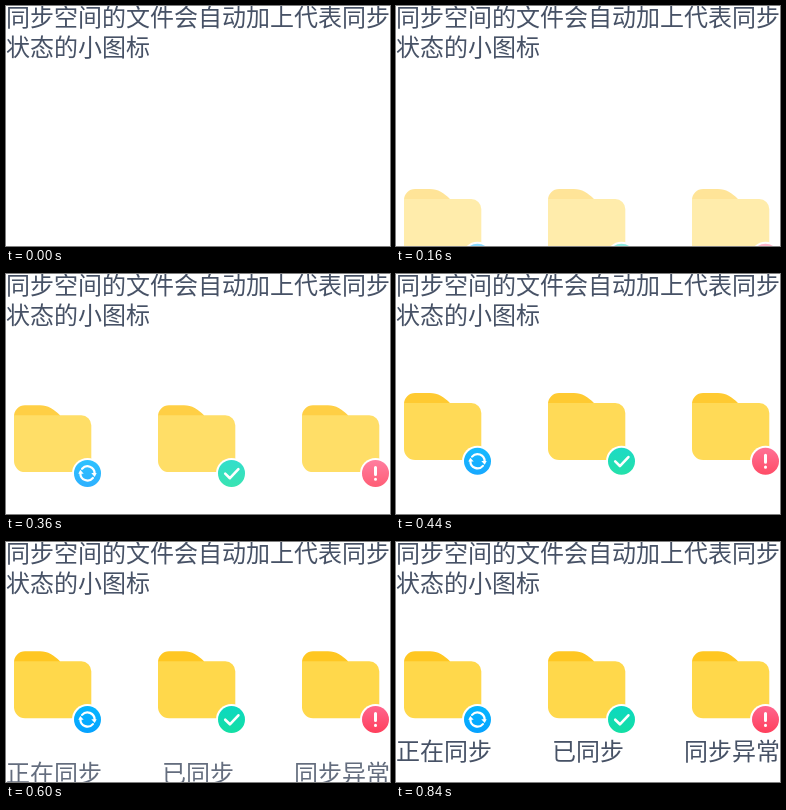
Animation of 384x240 px, one loop 3000 ms. Source, as an HTML page:

```html
<!DOCTYPE html>
<html lang="zh-CN">
<head>
<meta charset="utf-8">
<style>
html, body { margin: 0; width: 100%; height: 100%; overflow: hidden; background: #fff; }
svg { display: block; width: 384px; height: 240px; }
text { font: 24px "Noto Sans CJK SC", "Noto Sans CJK", sans-serif; fill: #475266; }
.icon { fill: none; stroke: #fff; stroke-linecap: round; stroke-linejoin: round; }
</style>
</head>
<body>
<svg viewBox="0 0 384 240">
  <defs>
    <linearGradient id="blue" x2="0" y2="1"><stop stop-color="#06b6ff"/><stop offset="1" stop-color="#06a2ff"/></linearGradient>
    <linearGradient id="green" x2="0" y2="1"><stop stop-color="#0cd8c2"/><stop offset="1" stop-color="#14dfa4"/></linearGradient>
    <linearGradient id="red" x2="0" y2="1"><stop stop-color="#ff668e"/><stop offset="1" stop-color="#ff3f5c"/></linearGradient>
    <g id="folder">
      <path fill="#ffc722" d="M8 124V120.3a11 11 0 0 1 11-11H34c8 0 14 4 20 10V124z"/>
      <path fill="#ffd84b" d="M8 119.3H75.3a10 10 0 0 1 10 10V165.2a11 11 0 0 1-11 11H19a11 11 0 0 1-11-11z"/>
      <circle cx="81.5" cy="177.5" r="15.5" fill="#fff"/>
    </g>
  </defs>
  <text x="0" y="20">同步空间的文件会自动加上代表同步</text>
  <text x="0" y="50">状态的小图标</text>

  <g id="folders">
    <g>
      <use href="#folder"/>
      <g transform="translate(81.5 177.5)">
        <circle r="13.5" fill="url(#blue)"/>
        <g id="arrow">
          <path class="icon" stroke-width="2.2" d="M-5.4-4.6A7.1 7.1 0 0 1 7.1 0"/>
          <path fill="#fff" d="M3.8-.3H9.2L7.2 3.6z"/>
        </g>
        <use href="#arrow" transform="rotate(180)"/>
      </g>
    </g>
    <g transform="translate(144)">
      <use href="#folder"/>
      <g transform="translate(81.5 177.5)">
        <circle r="13.5" fill="url(#green)"/>
        <path class="icon" stroke-width="2.6" d="M-6.3 .2L-1.6 4.8L6.9-4.2"/>
      </g>
    </g>
    <g transform="translate(288)">
      <use href="#folder"/>
      <g transform="translate(81.5 177.5)">
        <circle r="13.5" fill="url(#red)"/>
        <path class="icon" stroke-width="3" d="M0-6V1M0 5.8V5.9"/>
      </g>
    </g>
  </g>

  <g id="labels">
    <text x="0" y="218">正在同步</text>
    <text x="156" y="218">已同步</text>
    <text x="288" y="218">同步异常</text>
  </g>
</svg>
<script>
const LOOP = 3000, STEP = 40, DURATION = 600, RISE = 137;
const folders = document.getElementById('folders');
const labels = document.getElementById('labels');

// Rise into place while fading in, quadratic ease-out
function enter(group, time) {
  const left = 1 - Math.min(1, Math.max(0, time / DURATION));
  group.setAttribute('transform', `translate(0 ${RISE * left * left})`);
  group.setAttribute('opacity', 1 - left * left);
}

function draw() {
  const time = Math.floor(performance.now() % LOOP / STEP) * STEP;
  enter(folders, time);
  enter(labels, time - 240);
  requestAnimationFrame(draw);
}
draw();
</script>
</body>
</html>
```
